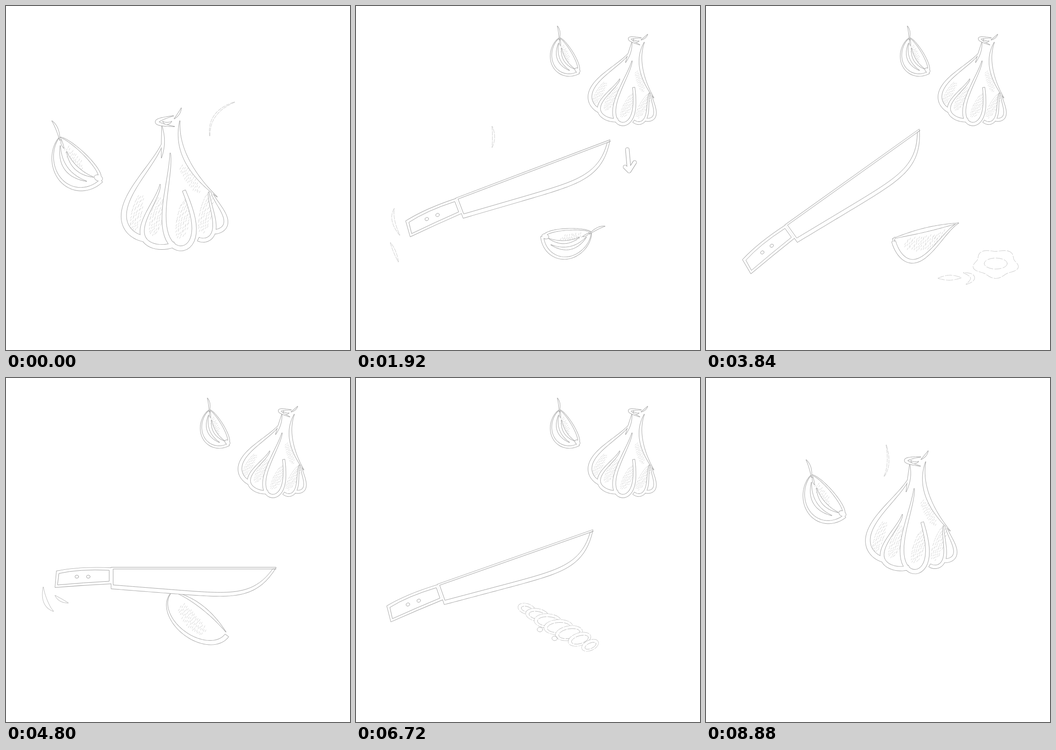
Animation of 748x748 px, one loop 9.12 s. Source, as an HTML page with a canvas:

```html
<!DOCTYPE html>
<html lang="en">
<head>
<meta charset="utf-8">
<title>Chopping garlic</title>
<style>
html, body { margin: 0; width: 100%; height: 100%; overflow: hidden; background: #fff; }
canvas { display: block; width: 748px; height: 748px; }
</style>
</head>
<body>
<canvas id="stage" width="748" height="748"></canvas>
<script>
const ctx = document.getElementById('stage').getContext('2d');
const STEP = 240, STEPS = 38;
const INK = '#a0a0a0', SOFT = '#b8b8b8', FAINT = '#c8c8c8';
const { sin, cos, PI, sqrt, hypot } = Math;
const mix = (a, b, p) => a + (b - a) * p;

// Outline of a brush stroke: point(u) is its centre line, width(u) its thickness.
function brush(point, width, n = 40) {
  const left = [], right = [];
  for (let i = 0; i <= n; i++) {
    const u = i / n, [x, y] = point(u);
    const [ax, ay] = point(u - .002), [bx, by] = point(u + .002);
    const s = width(u) / 2 / (hypot(bx - ax, by - ay) || 1);
    left.push([x - (by - ay) * s, y + (bx - ax) * s]);
    right.unshift([x + (by - ay) * s, y - (bx - ax) * s]);
  }
  return polygon([...left, ...right]);
}

function polygon(points) {
  const path = new Path2D();
  points.forEach(p => path.lineTo(...p));
  path.closePath();
  return path;
}

// A bent stroke, pointed at both ends.
function bend(x0, y0, cx, cy, x1, y1, thick) {
  const quad = (a, c, b, u) => mix(mix(a, c, u), mix(c, b, u), u);
  return brush(u => [quad(x0, cx, x1, u), quad(y0, cy, y1, u)], u => thick * sin(PI * u));
}

// Part of a teardrop outline: turn 0 is its tip, .5 its base; it thickens towards the base.
function lobe(tipX, tipY, baseX, baseY, half, from, to, thick, sharp = 1.5) {
  const dx = baseX - tipX, dy = baseY - tipY, length = hypot(dx, dy);
  const bulge = a => a ** sharp * sqrt(1 - a);
  const peak = bulge(sharp / (sharp + .5));
  const along = u => sin(PI * mix(from, to, u)) ** 2;
  return brush(u => {
    const a = along(u), side = mix(from, to, u) < .5 ? 1 : -1;
    const w = side * half * bulge(a) / peak / length;
    return [tipX + dx * a - dy * w, tipY + dy * a + dx * w];
  }, u => thick * sqrt(along(u)));
}

function ellipse(x, y, rx, ry, tilt = 0) {
  const path = new Path2D();
  path.ellipse(x, y, rx, ry, tilt, 0, 2 * PI);
  return path;
}

// Short slanted strokes filling an ellipse.
function hatch(cx, cy, rx, ry, tilt) {
  const path = new Path2D(), c = cos(tilt), s = sin(tilt);
  for (let y = -ry; y < ry; y += 6) {
    const half = rx * sqrt(1 - (y / ry) ** 2);
    for (let x = -half; x < half; x += 5) {
      const px = cx + x * c - y * s, py = cy + x * s + y * c + 2 * sin(x * 7 + y * 3);
      path.moveTo(px, py + 2);
      path.lineTo(px + 2, py - 2);
    }
  }
  return path;
}

function stroke(path, { at, color = INK, width = 1, dash = [] } = {}) {
  const placed = new Path2D();
  placed.addPath(path, at || new DOMMatrix());
  ctx.strokeStyle = color;
  ctx.lineWidth = width;
  ctx.lineJoin = ctx.lineCap = 'round';
  ctx.setLineDash(dash);
  ctx.stroke(placed);
  return placed;
}

// Shared silhouette of several shapes: all edges first, then all insides.
function ink(shapes, style = {}) {
  const placed = shapes.map(s => stroke(s, { width: 1.8, ...style }));
  ctx.fillStyle = '#fff';
  placed.forEach(p => ctx.fill(p));
}

const shade = (areas, at) => areas.forEach(a => stroke(a, { at, color: FAINT, width: .8 }));
const shift = (x, y) => new DOMMatrix().translate(x, y);
const place = (x, y, deg, sx, sy = sx) => shift(x, y).rotate(deg).scale(sx, sy);

// Bulb and clove are drawn around the top of the stem and of the string.
const bulb = {
  ink: [
    lobe(-6, 50, -48, 261, 53, 0, .5, 12), lobe(-12, 143, -4, 279, 45, 0, .56, 10),
    lobe(10, 75, 36, 282, 32, 0, .78, 10), lobe(94, 158, 78, 264, 24, .47, .96, 8),
    lobe(100, 158, 107, 246, 26, .5, .97, 9), bend(31, 5, 19, 90, 112, 170, 9),
    bend(-8, 16, -3, 50, -9, 85, 6),
    bend(17, -6, -55, 9, 19, 17, 7), bend(-6, 6, 2, 15, 13, 6, 4), bend(19, 0, 30, -10, 34, -23, 3)
  ],
  shade: [[-63, 205, 11, 42], [-19, 212, 14, 44], [39, 215, 14, 46], [87, 205, 13, 44], [53, 130, 9, 38, -.6]]
    .map(([x, y, rx, ry, tilt = .22]) => hatch(x, y, rx, ry, tilt)),
  home: [347, 245, 0, 1], rest: [608, 70, 16.5, .665]
};

const clove = {
  ink: [
    bend(0, 0, 13, 14, 17, 42, 4), lobe(16, 36, 107, 130, 62, 0, .5, 7, .6),
    lobe(16, 36, 103, 124, 13, .52, 1, 5, .6), bend(18, 54, 16, 115, 75, 131, 7),
    bend(32, 67, 45, 110, 90, 122, 7), bend(20, 40, 21, 51, 26, 59, 3), ellipse(101, 124, 9, 6, .4)
  ],
  shade: [hatch(47, 81, 9, 32, -.66)],
  home: [100, 250, 0, 1], rest: [438, 44, 14.7, .658]
};

const half = {
  ink: [lobe(549, 472, 408, 512, 54, .5, 1, 8), bend(549, 472, 480, 484, 406, 506, 8),
    bend(406, 515, 408, 506, 411, 503, 3)],
  shade: [hatch(468, 514, 37, 16, -.15), hatch(508, 498, 14, 9, -.45)]
};

const cut = {
  ink: [lobe(357, 470, 480, 560, 50, 0, .5, 9, .5), bend(368, 466, 430, 488, 478, 552, 6)],
  shade: [hatch(404, 525, 15, 42, -.7)]
};

const slices = Array.from({ length: 7 }, (_, i) => {
  const swell = sin(PI * i / 6);
  return [371 + 23 * i, 502 + 13.2 * i, 19 + 12 * swell, 11 + 5 * swell, .3 - .12 * i];
});

// Wavy loop of loose skin.
const skin = polygon(Array.from({ length: 60 }, (_, i) => {
  const a = i / 30 * PI, r = 1 + .1 * sin(5 * a);
  return [630 + 46 * r * cos(a), 560 + 29 * r * sin(a)];
}));

const knife = {
  blade: inset => {
    const points = [[inset / 2, inset / 2.5]];
    for (let u = 0; u <= 1; u += .02) {
      const depth = (46 + 28 * u) * (1 - u ** 8) - inset;
      points.push([inset / 2 + u * (358 - inset / 2), Math.max(depth, inset / 2.5)]);
    }
    return polygon([...points, [358, inset / 2.5]]);
  },
  handle: inset => new Path2D(`M${-inset},${1 + inset} Q-70,${inset - 2} ${inset - 119},${8 + inset}
    L${inset - 122},${43 - inset} Q-60,${38 - inset} ${-inset},${35 - inset}Z`),
  // step, x, y, degrees, size
  keys: [[6, 195, 452, -28, 1], [8, 217, 418, -20.7, 1], [12, 172, 476, -35.5, 1], [16, 172, 476, -35.5, 1],
    [20, 229, 412, 0, 1], [25, 243, 465, 5.7, 1], [30, 133, 438, -36, 1], [32, 133, 470, -20.2, .823]]
};

function knifePose(k) {
  const i = knife.keys.findLastIndex(key => key[0] <= k);
  const a = knife.keys[i], b = knife.keys[i + 1] || a;
  const p = a === b ? 0 : (k - a[0]) / (b[0] - a[0]);
  return a.map((v, j) => mix(v, b[j], p)).slice(1);
}

function drawGarlic(k) {
  const away = k < 6 ? k / 6 : k < 35 ? 1 : 1 - (k - 35) * .3;
  for (const [part, lag] of [[bulb, 1], [clove, 1.15]]) {
    const at = place(...part.home.map((v, i) => mix(v, part.rest[i], away ** lag)));
    shade(part.shade, at);
    ink(part.ink, { at });
  }
  const faint = { color: FAINT, dash: [7, 3] };
  if (k < 5) ink([bend(443, 282, 440, 230, 497, 209, 3)], { ...faint, at: shift(k * 35, -k * 20) });
  if (k > 35) ink([bend(392, 146, 402, 190, 387, 214, 3)], { ...faint, at: shift((37 - k) * 80, (k - 37) * 50) });
}

function drawPart(part) {
  shade(part.shade);
  ink(part.ink);
}

function drawPrep(k) {
  if (k < 12) {
    const at = place(541, 479, 221.2, .82, -.82);
    shade(clove.shade, at);
    ink(clove.ink, { at });
  } else drawPart(k < 18 ? half : cut);

  if (k < 10) {
    const arrow = new Path2D('M590,312 L594,358 M585,350 L594,359 L606,340');
    stroke(arrow, { width: 9 });
    stroke(arrow, { width: 7, color: '#fff' });
  }
  if (k > 13 && k < 19) {
    const style = { at: shift((k - 16) * (k < 16 ? 35 : 65), 0), color: FAINT, dash: [14, 4] };
    ink([skin, bend(505, 592, 530, 590, 555, 591, 10), bend(560, 580, 596, 588, 566, 605, 8)], style);
    stroke(ellipse(630, 560, 25, 12), style);
  }
}

function drawSlices(k) {
  const style = { color: SOFT, dash: [17, 3] };
  if (k < 28) for (const r of [5, 7, 4]) ink([ellipse(350 + r * 4, 474, r, r)]);
  for (const [x, y, rx, ry, tilt] of slices) {
    ink([ellipse(x, y, rx, ry, tilt)], { ...style, width: 1.4 });
    stroke(ellipse(x + 1, y + 1, rx - 6, ry - 5, tilt), style);
  }
  for (const [x, y] of [[400, 547], [432, 566]]) stroke(ellipse(x, y, 6, 5), { color: SOFT });
  if (k > 30) {
    ink([bend(455, 464, 473, 447, 492, 433, 4), bend(556, 466, 564, 460, 573, 460, 3),
      bend(557, 613, 563, 622, 571, 631, 4)], { color: FAINT, dash: [6, 3], width: 1.4 });
    ink([bend(556, 536, 565, 539, 584, 545, 8), ellipse(636, 545, 3, 2)], { color: SOFT, width: 1.4 });
  }
}

function drawKnife(k) {
  const [x, y, deg, size] = knifePose(k);
  const at = place(x, y, deg, size, size ** 3.5);
  ink([knife.handle(0), knife.blade(0)], { at });
  for (const edge of [knife.handle(5), knife.blade(8), ellipse(-75, 20, 4, 3.4), ellipse(-50, 20, 4, 3.4)])
    stroke(edge, { at });

  if (k < 10) {
    ink([bend(83, 441, 74, 465, 95, 498, 5), bend(75, 515, 84, 532, 92, 556, 4),
      bend(296, 262, 302, 285, 296, 307, 4)], { color: FAINT, dash: [8, 3] });
  } else if (k > 16 && k < 27) {
    const corner = at.transformPoint({ x: -118, y: 43 });
    ink([bend(-20, 0, -20, 38, 2, 52, 8), bend(6, 18, 16, 29, 34, 34, 5)],
      { at: shift(corner.x - 10, corner.y), color: k < 22 ? SOFT : INK });
  } else if (k > 30) {
    ink([bend(38, 531, 58, 546, 86, 543, 6)]);
    ink([bend(67, 525, 80, 531, 100, 527, 4), bend(74, 522, 105, 508, 144, 502, 6),
      bend(137, 473, 147, 482, 142, 502, 5)], { color: FAINT, dash: [9, 3], width: 1.4 });
  }
}

function render(time) {
  const k = Math.floor(time / STEP) % STEPS;
  ctx.fillStyle = '#fff';
  ctx.fillRect(0, 0, 748, 748);
  drawGarlic(k);
  if (k < 6 || k > 34) return;
  if (k < 22) drawPrep(k); else drawSlices(k);
  drawKnife(k);
}

let start;
function tick(now) {
  start ??= now;
  render(now - start);
  requestAnimationFrame(tick);
}
requestAnimationFrame(tick);
</script>
</body>
</html>
```
